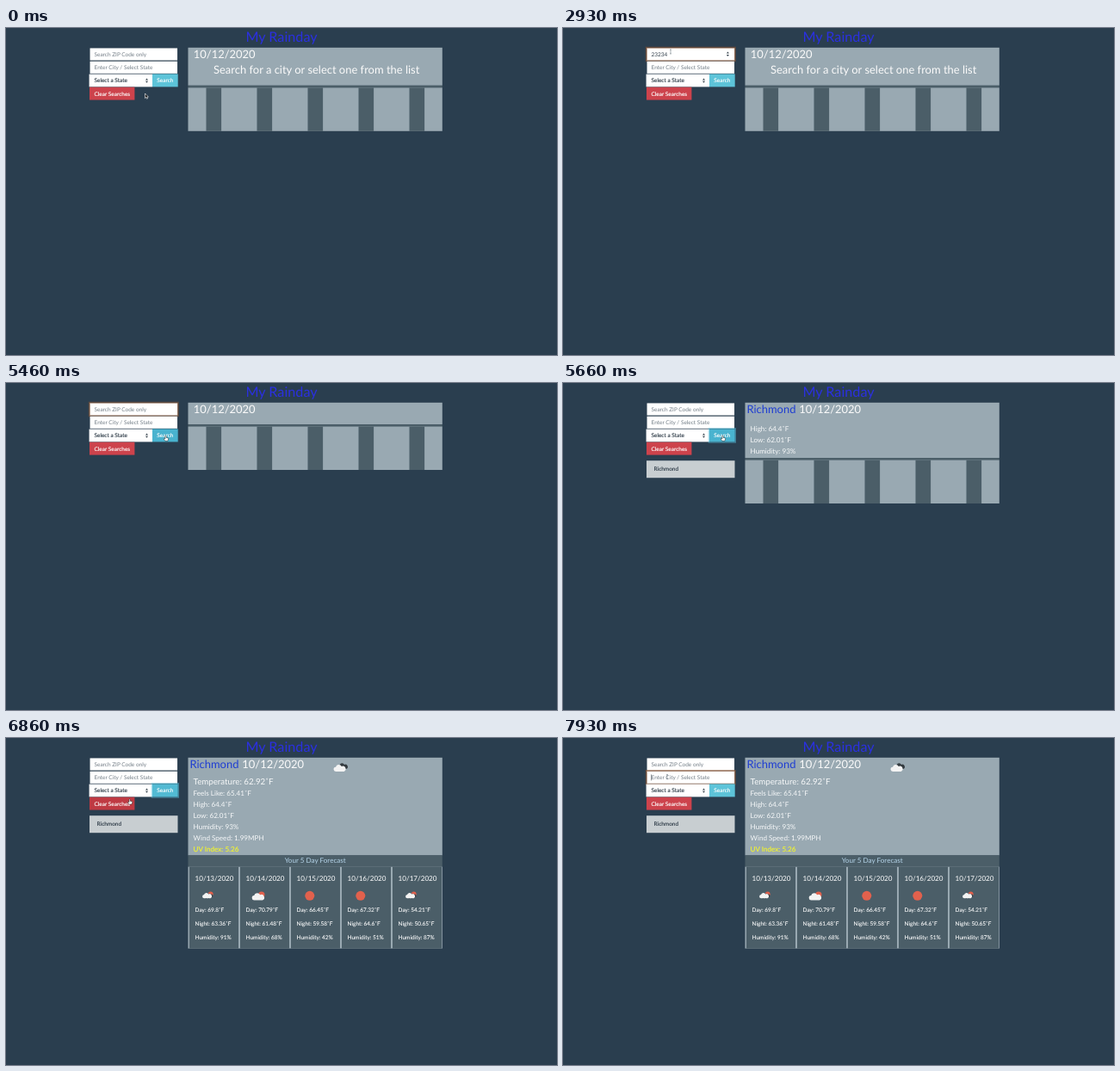
These frames come from a looping animation (640x380 px, 8000 ms). An HTML page:

```html
<!DOCTYPE html>
<html lang="en">
<head>
<meta charset="utf-8">
<title>Weather dashboard</title>
<style>
  html, body { margin: 0; width: 100%; height: 100%; overflow: hidden; background: #2a3e4f; }
  svg { display: block; width: 100vw; height: 100vh; }
  text { font-family: Lato, sans-serif; white-space: pre; text-rendering: geometricPrecision; }
</style>
</head>
<body>
<svg id="stage" viewBox="0 0 640 380"></svg>
<script>
const LOOP = 8000, STEP = 200 / 3;
const LIGHT = '#99a9b2', DARK = '#4b5e68', INK = '#2f3c48', HINT = '#727d86', ACCENT = '#1f3ed2';
const SIZE = { body: 6.48, h5: 8.1, h4: 9.72, h2: 12.96, h1: 16.2 };
const stage = document.getElementById('stage');

// [time, x, y] of the pointer's hot spot
const PATH = [
  [0, 161.5, 76], [60, 161, 75], [270, 146, 49], [530, 125, 27.5], [3930, 125, 27.5],
  [4070, 132.5, 30], [4530, 132.5, 30], [4800, 158, 45], [5130, 185.5, 61],
  [6330, 185.5, 61], [6600, 164, 68], [6860, 144, 71], [7130, 128, 62],
  [7200, 126, 57], [7400, 121.5, 47], [7600, 121.5, 46], [7930, 121, 45]
];
const KEYS = [[1660, '2'], [1930, '23'], [2130, '232'], [2400, '2323'], [2460, '23234']];
const CARET_ON = [[800, 1260], [1660, 2930], [3400, 3930], [4530, 5000]];
const DAYS = [
  ['10/13/2020', 'rain', '69.8', '63.36', 91],
  ['10/14/2020', 'partly', '70.79', '61.48', 68],
  ['10/15/2020', 'sun', '66.45', '59.58', 42],
  ['10/16/2020', 'sun', '67.32', '64.6', 51],
  ['10/17/2020', 'rain', '54.21', '50.65', 87]
];

const clamp = v => Math.max(0, Math.min(1, v));
const within = (t, [from, to]) => t >= from && t < to;

const rect = (x, y, w, h, fill, more = '') =>
  `<rect x="${x}" y="${y}" width="${w}" height="${h}" fill="${fill}" ${more}/>`;
const circle = (x, y, r, fill) => `<circle cx="${x}" cy="${y}" r="${r}" fill="${fill}"/>`;
const path = (d, more) => `<path d="${d}" ${more}/>`;
const text = (x, y, str, size, fill, more = '') =>
  `<text x="${x}" y="${y}" font-size="${size}" fill="${fill}" ${more}>${str}</text>`;
const heavy = fill => `stroke="${fill}" stroke-width=".14"`;
const middle = 'text-anchor="middle"';

const ring = (x, y, w, h, color, amount) => amount <= 0 ? '' :
  rect(x - .65, y - .65, w + 1.3, h + 1.3, 'none', `stroke="${color}" stroke-width="1.3" opacity="${amount}"`);

const cloud = (x, y, scale, fill) => path(
  'M-5 4a2.9 2.9 0 0 1-.4-5.8A4 4 0 0 1 2-2.6 3.4 3.4 0 0 1 5 4z',
  `fill="${fill}" transform="translate(${x} ${y}) scale(${scale})"`);

const icons = {
  sun: (x, y) => circle(x, y, 5.5, '#e1614d'),
  partly: (x, y) => circle(x + 3, y - 1.2, 3.7, '#e1614d') + cloud(x - .5, y + 1.4, .94, '#f3f3f3'),
  rain: (x, y) => circle(x + 3.2, y - 2, 2.9, '#e1614d') + cloud(x + 2.4, y - .2, .5, '#39434a') +
    cloud(x - .6, y, .72, '#f3f3f3') +
    path(`M${x - 2} ${y + 3}l-.5 1M${x + 1} ${y + 3}l-.5 1`, 'stroke="#39434a" stroke-width=".6"')
};

const upDown = (x, y) =>
  path(`M${x - 1.5} ${y - .6}l1.5-2 1.5 2zM${x - 1.5} ${y + .8}l1.5 2 1.5-2z`, 'fill="#35424d"');

const cursors = {
  arrow: path('M0 0V5.6L1.3 4.4 2.1 6.3 3 5.9 2.2 4.1H3.9z', 'fill="#151515" stroke="#fff" stroke-width=".6"'),
  beam: path('M-1-2.7Q0-2.7 0-2V2Q0 2.7-1 2.7M1-2.7Q0-2.7 0-2M0 2Q0 2.7 1 2.7',
    'fill="none" stroke="#53606a" stroke-width=".5"'),
  hand: path('M-.6.4Q0-.4.6.4V2.4L2.8 2.9Q3.3 3.1 3.1 4L2.5 6.3H-.7L-2.3 4Q-2.2 3-1.3 3.5L-.6 4z',
    'fill="#fff" stroke="#222" stroke-width=".5"')
};

function pointer(t) {
  let i = PATH.findIndex(p => p[0] > t);
  if (i < 0) i = PATH.length;
  const a = PATH[i - 1], b = PATH[i] || a;
  const k = b === a ? 0 : (t - a[0]) / (b[0] - a[0]);
  return [a[1] + (b[1] - a[1]) * k, a[2] + (b[2] - a[2]) * k];
}

function hovered(x, y) {
  if (x < 97 || x > 200) return '';
  if (y > 23 && y < 38) return 'zip';
  if (y > 38.5 && y < 53) return 'city';
  if (y > 53 && y < 68.5 && x > 170) return 'search';
  if (y > 69 && y < 83.5 && x < 149.5) return 'clear';
  return '';
}

// The white fill sits inside a clear border that is tinted while focused
function input(y, focus) {
  const x = 97.1, w = 102.4, h = 15, b = .45;
  return rect(x + b, y + b, w - 2 * b, h - 2 * b, '#fff') +
    (focus > 0 ? rect(x + b / 2, y + b / 2, w - b, h - b, 'none',
      `stroke="#e3a47c" stroke-width="${b}" stroke-opacity="${focus}"`) : '') +
    ring(x, y, w, h, 'rgba(223,105,26,.3)', focus);
}

function form(t, over) {
  const zipFocus = clamp((t - 770) / 200) * clamp((5630 - t) / 180);
  const searchFocus = clamp((t - 5460) / 150) * clamp((7830 - t) / 150);
  const cityFocus = clamp((t - 7630) / 150);
  const typing = t < 5460;
  const typed = typing ? (KEYS.filter(k => k[0] <= t).pop() || [0, ''])[1] : '';
  const zipCaret = CARET_ON.some(span => within(t, span));
  const caret = (x, y) => rect(x, y, .5, 7, '#222d36');
  const searchFill = over === 'search' ? '#49b3cf' : searchFocus > 0 ? '#52bad3' : '#5dc4d9';

  return input(23, zipFocus) + input(38.3, cityFocus) +
    rect(96.6, 53.6, 73.4, 14.8, '#fff') +
    (typed ? text(102.5, 32.8, typed, SIZE.body, INK) : text(102.5, 32.8, 'Search ZIP Code only', SIZE.body, HINT)) +
    (zipCaret ? caret(102.6 + typed.length * 3.76, 27) : '') +
    (over === 'zip' || (typing && zipFocus > 0) ? upDown(191.4, 30.2) : '') +
    text(102.5, 48.2, 'Enter City / Select State', SIZE.body, HINT) +
    (t >= 7660 ? caret(102.4, 42.4) : '') +
    text(102.5, 63.3, 'Select a State', SIZE.body, INK, heavy(INK)) +
    upDown(163.5, 61) +
    ring(170, 53.4, 29.7, 15, 'rgba(91,192,222,.5)', searchFocus) +
    rect(170, 53.4, 29.7, 15, searchFill) +
    text(175.3, 63.3, 'Search', SIZE.body, '#fff', heavy('#fff')) +
    rect(97, 68.7, 52.4, 14.9, over === 'clear' ? '#bf3a43' : '#cd434c') +
    text(102.5, 78.5, 'Clear Searches', SIZE.body, '#fff', heavy('#fff'));
}

const panel = bottom => rect(211.5, 22.8, 295.3, bottom - 22.8, LIGHT);

function emptyForecast(top) {
  let out = rect(211.5, top, 295.3, 3, DARK) + rect(211.5, top + 2.6, 295.3, 50.4, LIGHT);
  for (let i = 0; i < 5; i++) out += rect(232.5 + i * 59, top + 2.6, 17.6, 50.4, DARK);
  return out;
}

const lines = (list, y) => list.map((str, i) =>
  text(217.6, y + i * 12.95, str, SIZE.h5, '#f6f8f9')).join('');
const today = x => text(x, 35, '10/12/2020', SIZE.h2, '#fafafa');
const cityHead = () => text(213.4, 35, 'Richmond', SIZE.h2, ACCENT) + today(274.3);
const history = () => rect(97, 90.2, 102.5, 20, '#c8ced1') +
  text(105.6, 102.3, 'Richmond', SIZE.body, INK, heavy(INK));
const RANGE = ['High: 64.4˚F', 'Low: 62.01˚F', 'Humidity: 93%'];

function dayCard([date, icon, day, night, humidity], i) {
  const x = 219.6 + i * 59;
  const rows = [`Day: ${day}˚F`, `Night: ${night}˚F`, `Humidity: ${humidity}%`];
  const iconX = [234.5, 293.8, 352.8, 411.8, 470.5][i];
  return rect(213 + i * 59, 149.6, 57, 95, DARK) +
    text(x, 165.8, date, SIZE.h5, '#fff') +
    icons[icon](iconX, 183.3) +
    rows.map((row, n) => text(x, 201.8 + n * 16.1, row, SIZE.body, '#fff', 'stroke="#fff" stroke-width=".08"')).join('');
}

function results(t) {
  if (t < 5460) return panel(66.8) + today(217.8) +
    text(360.7, 53.3, 'Search for a city or select one from the list', SIZE.h2, '#fafafa', middle) + emptyForecast(66.8);
  if (t < 5600) return panel(48) + today(217.8) + emptyForecast(48);
  if (t < 5730) return panel(87) + cityHead() + lines(RANGE, 55.8) + emptyForecast(87) + history();
  return panel(136.4) + cityHead() +
    cloud(391.5, 32.9, .76, '#343b40') + cloud(388, 35.3, .92, '#f3f3f3') +
    text(217.6, 53.8, 'Temperature: 62.92˚F', SIZE.h4, '#f6f8f9') +
    lines(['Feels Like: 65.41˚F', ...RANGE, 'Wind Speed: 1.99MPH'], 66.8) +
    text(217.6, 131.5, 'UV Index: 5.26', SIZE.h5, '#f4f62a', heavy('#f4f62a')) +
    rect(211.5, 136.4, 295.3, 13.4, DARK) +
    text(359.2, 144.6, 'Your 5 Day Forecast', SIZE.h5, '#b4d3e8', middle) +
    rect(211.5, 149.6, 295.3, 95, LIGHT) +
    DAYS.map(dayCard).join('') + history();
}

function render(t) {
  const [x, y] = pointer(t), over = hovered(x, y);
  const kind = { zip: 'beam', city: 'beam', search: 'hand', clear: 'hand' }[over] || 'arrow';
  stage.innerHTML = text(320, 15.5, 'My Rainday', SIZE.h1, '#2b30e0', middle) +
    results(t) + form(t, over) +
    `<g transform="translate(${x} ${y})">${cursors[kind]}</g>`;
}

let shown = -1;
function tick() {
  const step = Math.floor((performance.now() % LOOP + 8) / STEP) % (LOOP / STEP);
  if (step !== shown) {
    shown = step;
    render(step * STEP);
  }
  requestAnimationFrame(tick);
}
tick();
</script>
</body>
</html>
```
